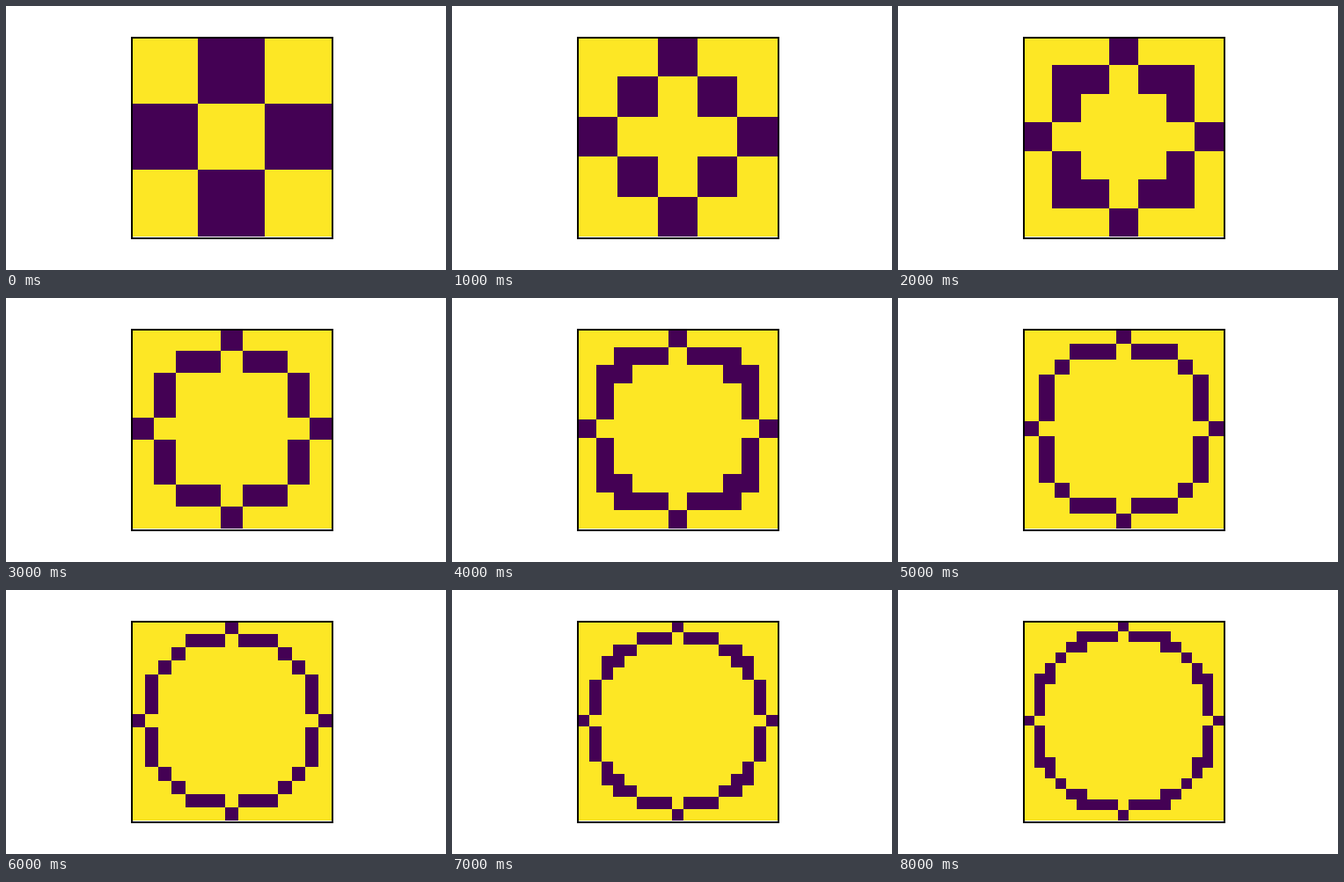
Recreate the animation shown at these times as an HTML page with a canvas. Size 500x300 px, loop 9 s.

```html
<!DOCTYPE html>
<html lang="en">
<head>
<meta charset="utf-8">
<title>Rasterised circle</title>
<style>
  html, body { margin: 0; width: 100%; height: 100%; overflow: hidden; background: #fff; }
  canvas { display: block; }
</style>
</head>
<body>
<canvas id="stage" width="500" height="300"></canvas>
<script>
const ctx = document.getElementById('stage').getContext('2d');
const LEFT = 143, BOTTOM = 262, SIZE = 227;
const STEP_MS = 1000, STEPS = 9;

// Pixel offsets where each of n cells starts, given a pixel -> 1/256 cell mapping.
function cellEdges(n, position) {
  const edges = [0];
  for (let px = 1; px < SIZE; px++) {
    if (position(px) >> 8 >= edges.length) edges.push(px);
  }
  return [...edges.slice(0, n), SIZE];
}

function draw(radius) {
  const n = 2 * radius + 1;
  const scale = 256 * n / SIZE;
  // Nearest-neighbour sampling: columns accumulate steps, rows round each one.
  const first = Math.round(scale / 2) - Math.ceil(scale);
  const cols = cellEdges(n, px => first + Math.ceil(scale * (px + 1)));
  const rows = cellEdges(n, px => Math.round(scale * (px + 0.5)));

  ctx.fillStyle = '#fff';
  ctx.fillRect(0, 0, 500, 300);
  ctx.fillStyle = '#fde725';
  ctx.fillRect(LEFT, BOTTOM - SIZE, SIZE, SIZE);

  ctx.fillStyle = '#440154';
  for (let j = 0; j < n; j++) {
    for (let i = 0; i < n; i++) {
      const d = Math.hypot(i - radius, j - radius);
      if (d > radius - 1 && d <= radius) {
        ctx.fillRect(LEFT + cols[i], BOTTOM - rows[j + 1],
          cols[i + 1] - cols[i], rows[j + 1] - rows[j]);
      }
    }
  }

  ctx.strokeStyle = '#000';
  ctx.lineWidth = 2;
  ctx.strokeRect(143, 36, 228, 228);
}

const start = performance.now();
let shown = 0;
function tick() {
  const elapsed = performance.now() - start;
  const radius = 1 + Math.floor(elapsed / STEP_MS) % STEPS;
  if (radius !== shown) draw(shown = radius);
  requestAnimationFrame(tick);
}
tick();
</script>
</body>
</html>
```
